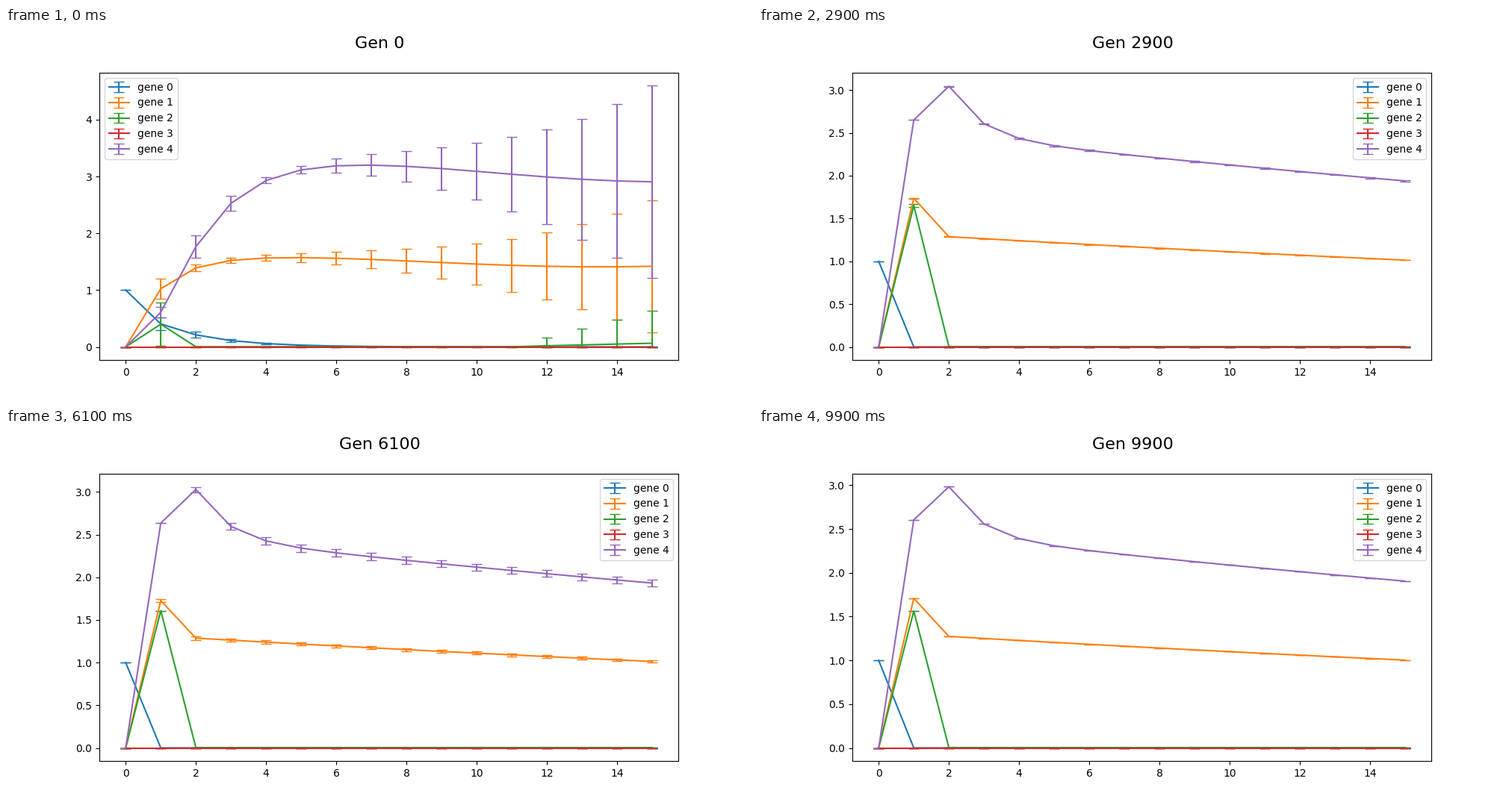
Animation of 1000x500 px, one loop 10000 ms. Source, as a matplotlib script:

```python
import numpy as np
import matplotlib.pyplot as plt
from matplotlib.animation import FuncAnimation

FRAMES, STEP = 100, 100
SETTLED = 1.7      # thousands of generations until the start has faded
FLOOR = 0.003      # remaining level of gene 2
x = np.arange(16.0)


def first_population():
    """Mean and spread of each gene in generation 0."""
    mean, err = np.zeros((2, 5, 16))
    mean[0] = np.where(x == 0, 1, 0.405 * 0.525 ** (x - 1))
    mean[1] = 1.5 + 0.09 * np.cos(np.pi * (x - 3.5) / 10) - 1.541 * 0.35 ** x
    mean[2] = np.where(x < 12, FLOOR, 0.005 + 0.015 * (x - 11))
    mean[2, 1] = 0.4
    rise = (1 + 1.275 * x) * 0.36 ** x
    mean[4] = 3.08 + 0.175 * np.cos(np.pi * (x - 5) / 10.5) - 3.093 * rise
    mean[1:, 0] = 0

    growth = 1.225 ** (x - 15)
    err[0] = 0.108 * 0.5 ** (x - 1)
    err[1] = np.maximum(1.25 * growth - 0.09, 0) + 0.171 * 0.35 ** (x - 1)
    err[2] = 0.144 * np.maximum(x - 11, 0)
    err[2, 1] = 0.385
    bump = 0.2 * np.exp(-((x - 2.15) / 1.35) ** 2)
    err[4] = np.maximum(1.87 * growth - 0.18, 0) + bump
    err[:, 0] = 0
    return mean, err


def evolved_population(t):
    """Mean and spread after t thousand generations."""
    # The spread widens with time, then the population becomes uniform
    s = max(0.00093 * t * t - 0.0027, 0) * np.clip((9.9 - t) / 1.3, 0, 1)
    age = t - SETTLED
    decay = 0.9818 ** (x - 15)

    mean, err = np.zeros((2, 5, 16))
    mean[0, 0] = 1
    mean[1] = (1.0145 - 0.0014 * age + 0.16 * s) * decay
    mean[2] = FLOOR
    tail = (1.942 - 0.0045 * age + 0.33 * s) * decay
    peak = 3.049 - 0.00068 * t * t + 0.15 * s
    mean[4] = tail + (peak - tail[2]) * 0.325 ** (x - 2)
    mean[1:, 0] = 0
    mean[1, 1] = 1.738 - 0.0003 * t * t
    mean[2, 1] = 1.662 - 0.001 * t * t - 0.5 * s
    mean[4, 1] = 2.654 - 0.0005 * t * t

    err[1] = s * np.interp(x, [0, 1, 2, 15], [0, 0.6, 0.65, 0.5])
    err[2, 1] = np.interp(t, [1.7, 4, 5.1, 7, 8.6, 9.9], [0, 0.035, 0, 0, 0.079, 0])
    err[4] = s * np.interp(x, [1, 2, 4, 15], [0, 1, 1.4, 1.15])
    return mean, err


START = first_population()


def population(gen):
    mean, err = evolved_population(max(gen / 1000, SETTLED))
    if gen < 1000 * SETTLED:
        w, we = np.exp(-gen / 250), np.exp(-gen / 100)
        mean = w * START[0] + (1 - w) * mean
        err = we * START[1] + (1 - we) * err
    return mean, err


fig, ax = plt.subplots(figsize=(10, 5), dpi=100)
title = fig.suptitle("", fontsize=16, y=0.978)


def draw(i):
    gen = i * STEP
    ax.clear()
    title.set_text(f"Gen {gen}")
    for k, (m, e) in enumerate(zip(*population(gen))):
        low = np.clip(m, 0, e)
        ax.errorbar(x, m, yerr=[low, e], capsize=5, label=f"gene {k}")
    ax.legend(loc="best")
    return []


anim = FuncAnimation(fig, draw, frames=FRAMES, init_func=lambda: [],
                     interval=100, repeat=True, repeat_delay=0)
plt.show()
```
